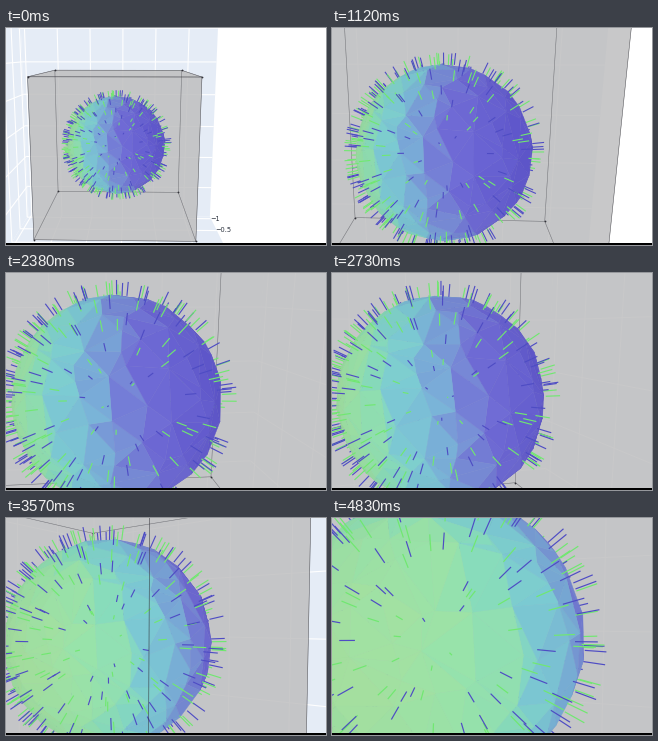
A matplotlib script for the animation above (4.97 s loop, 320 px wide and 217 px high).

```python
import itertools
import numpy as np
import matplotlib.pyplot as plt
from matplotlib.animation import FuncAnimation
from matplotlib.collections import LineCollection, PolyCollection
from matplotlib.patches import Rectangle
from matplotlib.tri import Triangulation

W, H, DPI = 320, 217, 64
PX = 72 / DPI            # points per pixel
FRAMES, STEP = 71, 70
FOCAL = 455
BOX, ROOM = 1.47, 2.45   # half sizes, sphere radius is 1
GRID = 0.82
SPIKE = 0.13

rng = np.random.default_rng(8)


def rgb(*c):
    return np.array(c) / 255


SKY, GREY, INK = rgb(229, 236, 246), rgb(190, 190, 191), rgb(50, 50, 56)
GREEN, VIOLET = rgb(112, 232, 112), rgb(78, 76, 196)

# camera path: frame, distance, yaw, elevation, centre x, centre y
PATH = np.array([
    (0, 9.40, -1.4, 11.5, 110.5, 117),
    (4, 9.25, -1.6, 11.6, 110.5, 117),
    (9, 9.25, -1.6, 11.6, 110.5, 117),
    (12, 8.50, -2.0, 12.0, 110.5, 117),
    (14, 6.90, -2.4, 13.5, 111, 120),
    (17, 4.42, -3.0, 16.0, 113, 127),
    (24, 4.41, -2.2, 16.8, 113, 127),
    (26, 4.41, -2.2, 16.8, 113, 127),
    (27, 4.41, -1.8, 16.5, 113, 127),
    (34, 4.43, 6.0, 13.0, 111, 127),
    (39, 4.45, 14.5, 9.0, 109, 127),
    (44, 4.48, 35.5, 3.0, 105, 126),
    (51, 4.48, 51.0, 2.6, 102, 125),
    (59, 4.46, 66.0, 3.0, 100, 124),
    (65, 3.45, 67.0, 3.0, 104, 122),
    (67, 3.45, 67.0, 3.0, 104, 122),
    (69, 3.23, 67.0, 3.0, 105, 122),
])

# colour along the axis of the shade
LEVELS = [-1, -0.45, -0.25, 0, 0.2, 0.4, 0.6, 1]
SHADES = np.array([(97, 88, 208), (112, 108, 214), (120, 140, 215),
                   (122, 180, 216), (125, 205, 212), (135, 220, 190),
                   (152, 227, 170), (165, 225, 160)]) / 255
TILT = np.radians(-108)
AXIS = np.array([np.sin(TILT), -0.12, -np.cos(TILT)])
AXIS /= np.linalg.norm(AXIS)


def shade(t):
    return np.stack([np.interp(t, LEVELS, SHADES[:, i]) for i in range(3)], -1)


def unit(v):
    return v / np.linalg.norm(v, axis=-1, keepdims=True)


def scatter(n, jitter, pull):
    """Jittered spiral on the sphere, drawn towards the bright pole."""
    k = np.arange(n) + 0.5
    y = 1 - 2 * k / n
    a = k * np.pi * (3 - 5 ** 0.5)
    r = np.sqrt(1 - y * y)
    p = np.stack([r * np.cos(a), y, r * np.sin(a)], -1)
    p += rng.normal(0, jitter, p.shape)
    return unit(unit(p) + pull * AXIS)


def build_mesh():
    """Delaunay in stereographic projection gives the hull triangles."""
    a = np.radians(32)
    back = np.array([np.sin(a), 0, np.cos(a)])
    side = np.array([np.cos(a), 0, -np.sin(a)])
    p = scatter(230, 0.07, 0.18)
    p = p[p @ back < 0.985]
    q = 1 - p @ back
    return p, Triangulation(p @ side / q, p[:, 1] / q).triangles


VERTS, TRIS = build_mesh()
MIDS = unit(VERTS[TRIS].mean(1))
FACE_RGB = shade(MIDS @ AXIS + rng.normal(0, 0.045, len(MIDS)))
BASES = [(scatter(250, 0.09, 0.22), GREEN), (scatter(240, 0.09, 0.22), VIOLET)]

CORNERS = BOX * np.array(list(itertools.product((-1, 1), repeat=3)))
FACES = []
for ax_id, sign in itertools.product(range(3), (-1, 1)):
    ids = [i for i in range(8) if CORNERS[i, ax_id] * sign > 0]
    FACES.append(([ids[0], ids[1], ids[3], ids[2]], np.eye(3)[ax_id] * sign))


class Camera:
    def __init__(self, frame):
        self.dist, yaw, elev, self.cx, self.cy = (
            np.interp(frame, PATH[:, 0], PATH[:, i]) for i in range(1, 6))
        self.yaw = yaw
        a, e = np.radians(yaw), np.radians(elev)
        turn = np.array([[np.cos(a), 0, -np.sin(a)], [0, 1, 0],
                         [np.sin(a), 0, np.cos(a)]])
        tip = np.array([[1, 0, 0], [0, np.cos(e), np.sin(e)],
                        [0, -np.sin(e), np.cos(e)]])
        self.rot = tip @ turn
        self.eye = np.array([0, 0, -self.dist]) @ self.rot

    def view(self, p):
        return np.asarray(p, float) @ self.rot.T

    def project(self, p):
        v = self.view(p)
        k = FOCAL / np.maximum(v[..., 2] + self.dist, 0.15)
        return np.stack([self.cx + v[..., 0] * k, self.cy - v[..., 1] * k], -1)


fig = plt.figure(figsize=(W / DPI, H / DPI), dpi=DPI, facecolor="white")
ax = fig.add_axes([0, 0, 1, 1])


def polys(pts, color, z, alpha=None, edge="none", lw=0):
    ax.add_collection(PolyCollection(pts, facecolors=color, edgecolors=edge,
                                     linewidths=lw * PX, alpha=alpha, zorder=z))


def lines(segs, color, width, z, alpha=None):
    ax.add_collection(LineCollection(segs, colors=[color], linewidths=width * PX,
                                     alpha=alpha, zorder=z))


def draw_room(cam):
    side = ROOM if cam.yaw > 0 else -ROOM
    walls = [
        (lambda u, v: (u, v, ROOM), 0.1, 0),
        (lambda u, v: (side, v, u), 0.65, 0),
        (lambda u, v: (u, -ROOM, v), 0.1, 0.65),
    ]
    for wall, du, dv in walls:
        quad = [wall(u, v) for u, v in ((-ROOM, -ROOM), (ROOM, -ROOM),
                                        (ROOM, ROOM), (-ROOM, ROOM))]
        polys([cam.project(quad)], [SKY], 1)
        segs = []
        for k in range(-4, 5):
            u, v = du + GRID * k, dv + GRID * k
            if abs(u) <= ROOM:
                segs.append([wall(u, -ROOM), wall(u, ROOM)])
            if abs(v) <= ROOM:
                segs.append([wall(-ROOM, v), wall(ROOM, v)])
        lines(cam.project(segs), "white", 1.1, 2)


def draw_ticks(cam):
    if cam.yaw > 0:
        return
    for label, z in (("−1", 2.3), ("−0.5", 1.49)):
        x, y = cam.project((ROOM, -ROOM, z))
        if y < H + 4:
            ax.text(x - 1, y, label, size=6.6 * PX, color=rgb(42, 48, 60),
                    va="center", ha="left", family="DejaVu Sans", zorder=3,
                    clip_on=True)


def draw_box(cam):
    pts = cam.project(CORNERS)
    near = [n @ cam.eye > BOX for _, n in FACES]
    for flag, z in ((False, 4), (True, 5)):
        for (ids, _), front in zip(FACES, near):
            if front == flag:
                polys([pts[ids]], [GREY], z, 0.6)
    for (ids, _), front in zip(FACES, near):
        segs = [pts[[ids[i], ids[i - 1]]] for i in range(4)]
        lines(segs, INK, 0.5, 11 if front else 6, 0.6 if front else 0.32)
    ax.plot(*pts.T, "o", ms=1.8 * PX, mew=0, color=INK, zorder=6)


def draw_sphere(cam):
    size = FOCAL / cam.dist
    width = np.interp(size, [48, 105, 148], [0.95, 1.15, 1.2])
    v = cam.view(VERTS)[TRIS]
    normal = np.cross(v[:, 1] - v[:, 0], v[:, 2] - v[:, 0])
    mid = v.mean(1)
    normal *= np.sign((normal * mid).sum(1))[:, None]
    front = (normal * (mid + [0, 0, cam.dist])).sum(1) < 0
    facing = np.clip(-unit(normal)[:, 2], 0, 1)
    color = FACE_RGB * (0.88 + 0.12 * np.sqrt(facing))[:, None]
    polys(cam.project(VERTS)[TRIS][front], color[front], 8,
          edge=color[front], lw=0.4)
    for base, tint in BASES:
        seg = cam.project(np.stack([base, base * (1 + SPIKE)], 1))
        seen = cam.view(base)[:, 2] < -1 / cam.dist
        lines(seg[~seen], tint, width, 7)
        lines(seg[seen], tint, width, 9)


def draw_hover(cam, i):
    if 10 <= i <= 14:
        top, knee, end = cam.project([(1.7, ROOM, ROOM), (1.7, -1.45, ROOM),
                                      (ROOM, -1.45, ROOM)])
        lines([[top, knee], [knee, end]], INK, 0.8, 3)
        lines([[top, knee]], INK, 0.5, 6, 0.25)
        ax.add_patch(Rectangle((203, 210.5), 30, 8, fc=rgb(140, 140, 144),
                               ec=INK, lw=0.8 * PX, zorder=12))
        ax.text(217, 215.5, "0.75", size=6.6 * PX, ha="center", va="center",
                color=INK, zorder=13)
        ax.text(235, 216, "trace 1548", size=6.4 * PX, va="center",
                color=rgb(130, 130, 134), zorder=12)
    elif 55 <= i <= 62:
        seg = cam.project([(ROOM, -ROOM, -0.95), (ROOM, ROOM, -0.95)])
        lines([seg], INK, 0.7, 6, 0.65)


def draw(i):
    ax.cla()
    ax.set(xlim=(0, W), ylim=(H, 0))
    ax.axis("off")
    cam = Camera(i)
    draw_room(cam)
    draw_ticks(cam)
    draw_box(cam)
    draw_sphere(cam)
    draw_hover(cam, i)
    ax.add_patch(Rectangle((0, 215.4), W, 2, fc="black", lw=0, zorder=20))
    return []


anim = FuncAnimation(fig, draw, frames=FRAMES, interval=STEP, repeat=True,
                     repeat_delay=0, init_func=lambda: [])
plt.show()
```
